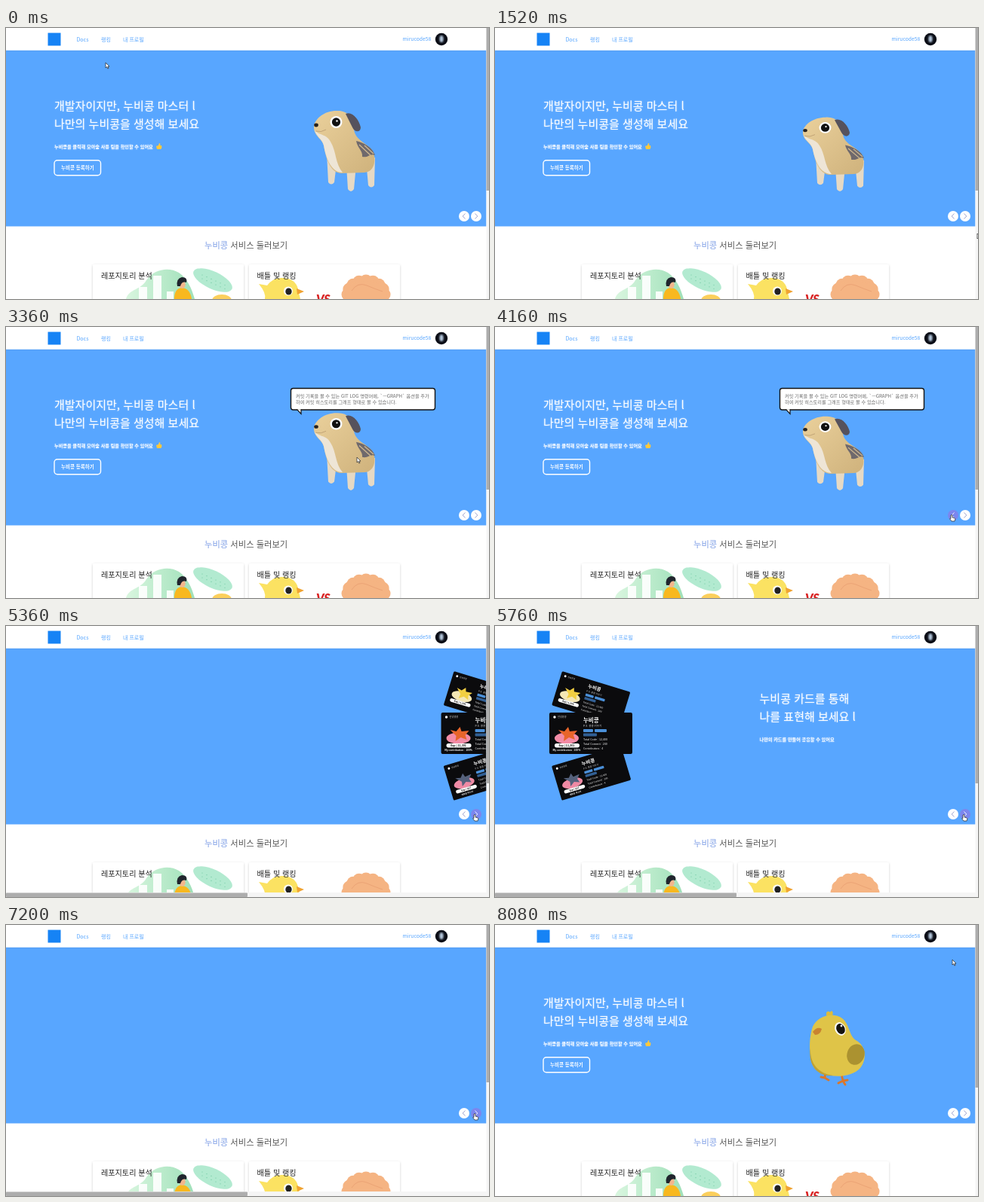
An HTML page that plays this animation: 640 by 360 pixels, repeating every 8160 ms.

```html
<!DOCTYPE html>
<html lang="ko">
<head>
<meta charset="utf-8">
<style>
  html, body { margin: 0; width: 100%; height: 100%; overflow: hidden; background: #fff; }
  svg { display: block; width: 640px; height: 360px; font-family: "Noto Sans CJK KR", "Noto Sans", sans-serif; }
  .glow { text-shadow: 0 0 2px #ffffff80; }
</style>
</head>
<body>
<svg id="stage" viewBox="0 0 640 360"></svg>
<script>
const LOOP = 8160, FRAME = 80, WIDTH = 636.5, BLUE = '#58a6ff';

// Text is placed by its left edge and vertical centre.
const text = (x, y, size, s, attrs = '') =>
  `<text x="${x}" y="${y + size * .36}" font-size="${size}" ${attrs}>${s}</text>`;
const rect = (x, y, w, h, fill, attrs = '') =>
  `<rect x="${x}" y="${y}" width="${w}" height="${h}" fill="${fill}" ${attrs}/>`;
const oval = (x, y, rx, ry, fill, attrs = '') =>
  `<ellipse cx="${x}" cy="${y}" rx="${rx}" ry="${ry}" fill="${fill}" ${attrs}/>`;
const path = (d, fill, attrs = '') => `<path d="${d}" fill="${fill}" ${attrs}/>`;
const group = (attrs, ...parts) => `<g ${attrs}>${parts.join('')}</g>`;

const headline = (x, y, a, b, note) => group('fill="#fff" class="glow"',
  text(x, y, 15, a, 'font-weight="500"'),
  text(x, y + 24, 15, b, 'font-weight="500"'),
  text(x, y + 53.5, 6.15, note, 'font-weight="700"'));

const dog = group('id="dog"',
  path('M425 166L427 205Q431 210 435 205L438 180ZM451 182L453 214Q457 220 461 214L464 182ZM477 175L480 209Q484 214 488 209L489 172Z', '#e6d9c4'),
  path('M408 130C410 120 422 110 438 110C452 109 460 118 461 135C463 149 477 152 485 162C491 171 490 191 475 192L444 193C429 192 424 173 421 156C419 147 407 143 408 130Z', 'url(#fur)'),
  path('M409 136C417 144 424 140 430 151C438 164 436 180 446 192C431 192 424 173 421 156C419 147 411 144 409 136Z', '#eee5d6'),
  path('M464 150C474 152 486 159 489 169C482 166 480 173 472 171C473 163 466 160 464 150Z', '#6f696c'),
  path('M468 155L483 169M475 156L487 167', 'none', 'stroke="#cdb78f" stroke-width="1.3"'),
  path('M450 114C459 110 468 122 470 132C470 139 462 139 459 132Z', '#56525d'),
  oval(437.5, 125, 8, 8, '#fff'), oval(437.5, 125, 5.6, 5.8, '#111'), oval(438.5, 123.5, 1.2, 1.2, '#fff'),
  oval(411, 129, 2.8, 2.4, '#26221f'),
  path('M410 137Q418 139 424 135', 'none', 'stroke="#b2936a" stroke-width=".7"'));

const chick = group('id="chick"',
  path('M438 194L437 203L432 202M437 203L442 206M459 198L461 207L455 210M461 207L464 212M461 207L467 206', 'none', 'stroke="#d9772c" stroke-width="3" stroke-linecap="round"'),
  path('M440 122C437 116 441 113 444 116C446 112 449 115 447 121Z', '#dcbc3d'),
  path('M421 135C427 121 448 115 460 124C470 132 469 147 478 153C492 160 493 179 484 190C473 202 449 204 432 196C414 187 415 153 421 135Z', '#dfc448'),
  path('M418 163C417 184 428 197 448 200C429 202 414 188 418 163Z', '#bfa234'),
  oval(478, 172, 11.5, 14, '#ab9230', 'transform="rotate(18 478 172)"'),
  oval(457.5, 138, 7, 9, '#fff', 'transform="rotate(-25 457.5 138)"'),
  oval(458, 138, 5.5, 7.3, '#17140f', 'transform="rotate(-25 458 138)"'), oval(459, 134, 1.4, 1.4, '#fff'),
  path('M421 142Q427 134 433 138Q431 146 424 146Z', '#c98330'));

const bubble = group('id="bubble"',
  rect(377.5, 81.5, 191, 28.5, '#fff', 'rx="3" stroke="#111" stroke-width="1.4"'),
  path('M385.5 109.3L391 115.5V109.3', '#fff', 'stroke="#111" stroke-width="1.2"'),
  group('fill="#666"', text(384, 91.5, 6.2, '', 'id="tip1"'), text(384, 100, 6.2, '', 'id="tip2"')));

const home = group('id="s0"',
  headline(64, 104, '개발자이지만, 누비콩 마스터 l', '나만의 누비콩을 생성해 보세요', '누비콩을 클릭해 모아숲 사용 팁을 확인할 수 있어요'),
  path('M199 157L202 156L203 153Q205 153 204 156H206Q207 160 205 161H200Z', '#ffc83d'),
  rect(64, 175.8, 61.5, 20, 'none', 'rx="4" stroke="#fff" stroke-width="1.4"'),
  text(73, 185.5, 6.5, '누비콩 등록하기', 'font-weight="700" fill="#fff"'),
  dog, chick, bubble);

const card = (place, tint, base, exp, foot) => group(`transform="${place}"`,
  rect(0, 0, 110, 55, '#0b0b0d', 'rx="2"'),
  oval(7, 6, 1.7, 1.7, '#fff'), text(11, 6, 3.2, '안녕콩콩', 'fill="#ddd"'),
  oval(23, 34, 16, 7.5, base),
  path('M12 23L20 25L25 19L27 25L37 24L32 30L34 36L26 33L19 38L20 31Z', tint),
  rect(7, 41, 33, 5.5, '#fff', 'rx="2.7"'),
  text(23, 43.7, 3.5, exp, 'text-anchor="middle" font-weight="700"'),
  text(23, 50, 3.2, foot, 'text-anchor="middle" font-weight="700" fill="#fff"'),
  text(45, 10, 7.5, '누비콩', 'font-weight="700" fill="#fff"'),
  text(45, 18, 3.5, 'P.S&#160; 콩콩 키우기', 'fill="#ddd"'),
  rect(45, 22, 13, 4, '#4a8fd8', 'rx="1"'), rect(60, 22, 16, 4, '#4a8fd8', 'rx="1"'), rect(45, 27.5, 18, 4, '#315f94', 'rx="1"'),
  ...['Total Code : 12,400', 'Total Commit : 240', 'Contributors : 4'].map((s, i) => text(45, 36 + i * 6, 3.6, s, 'fill="#fff"')));

const cards = group('id="s1"',
  card('translate(88.4 60) rotate(17) scale(.86)', '#f2cf42', '#f4e7b5', 'Exp | 1,204', ''),
  card('translate(74.4 186) rotate(-16.6) scale(.87)', '#55617c', '#ef8aa4', 'Exp | 527', '새로운 마스터'),
  card('translate(71.4 115)', '#e8652a', '#f28ba6', 'Exp | 11,301', 'My contribution : 100%'),
  headline(350, 97, '누비콩 카드를 통해', '나를 표현해 보세요 l', '나만의 카드를 만들어 공유할 수 있어요'));

const stats = [['경쟁력: 227', '#e05252'], ['승격력: 20', '#e5b53c'], ['방어률: 15%', '#64a866'],
  ['치명타율: 15%', '#7a86d8'], ['회피율: 21%', '#5a9bd5'], ['명중률: 12%', '#4b8de0']];
const panel = group('transform="translate(309 106) rotate(-9.3)"',
  rect(0, 0, 90, 93, '#fff', 'rx="1"'),
  text(6, 8, 5.4, '능력치', 'fill="#333"'), text(24, 8, 4, '스탯 포인트: 21', 'fill="#777"'),
  ...stats.map(([s, c], i) => {
    const y = 23 + i * 11.8;
    return oval(9, y, 2.8, 2.8, c) + oval(9, y, 1.1, 1.1, '#fff') + text(15, y, 4.6, s, 'fill="#444"') +
      (i < 2 ? oval(78, y + 9, 2.8, 2.8, '#444') + text(76.4, y + 9, 5, '+', 'fill="#fff"') : '');
  }));

const status = (x, y, name) => group(`transform="translate(${x} ${y})"`,
  rect(0, 0, 71, 23, '#fff', 'stroke="#222" stroke-width="1.4"'),
  text(5, 6, 4, name, 'fill="#333"'), text(5, 12.5, 3.8, 'HP : 100 / 100', 'fill="#333"'),
  rect(5, 17, 58, 2.4, '#5aa9a0'));
const battle = group('transform="translate(400 79) rotate(5)"',
  rect(0, 0, 165, 118.5, '#fff', 'rx="1"'),
  rect(2, 6, 161, 82, '#68b32f'), rect(2, 6, 161, 5, '#3f7a2c'),
  path('M45 31C61 24 82 28 83 44L81 62L58 72Z', '#d8b950'),
  path('M2 46C20 31 54 39 66 60C75 82 48 89 22 84L2 78Z', '#27494c'),
  status(10, 8, '상대 누비콩: 도토리콩'), status(88, 57, '내 누비콩: 별이콩'),
  text(65, 103, 5.2, '하우....힘겹다...&#160; ▾', 'fill="#333"'));

const fight = group('id="s2"',
  headline(64, 97, '누비콩 배틀을 통해', '랭킹에 도전해 보세요 l', '모아숲 활동을 통해 얻은 경험치로 스탯을 올릴 수 있어요'),
  oval(216, 151, 4, 4, '#ffc83d'), path('M212 149H220V151Q218 153 216 150Q214 153 212 151Z', '#222'),
  panel, battle);

const header = group('',
  rect(0, 0, WIDTH, 29.5, '#fff', 'filter="url(#faint)"'),
  rect(55.5, 6.5, 17, 17, '#1683f5'),
  group(`fill="${BLUE}"`, text(93.5, 15, 7, 'Docs'), text(126, 15, 7, '랭킹'), text(155, 15, 7, '내 프로필'), text(525.5, 15, 6.8, 'mirucode58')),
  oval(577, 15, 8.2, 8.2, '#0a0d16'), oval(577, 14.5, 2.6, 4.5, '#b8cbe0', 'filter="url(#blur)"'));

const frame = x => rect(x, 314, 200, 60, '#fff', 'rx="2" filter="url(#soft)"');
const fluff = Array.from({ length: 9 }, (_, i) => {
  const a = Math.PI * (1 + i / 8);
  return oval(477 + 24 * Math.cos(a), 354 + 18 * Math.sin(a), 8.5, 8.5, '#f5b483');
}).join('');
const services = group('',
  text(263, 288.5, 11.3, '<tspan fill="#7f9fe6">누비콩</tspan> 서비스 둘러보기', 'fill="#555" font-weight="300"'),
  frame(115), frame(322),
  path('M159 360C163 346 178 349 186 335C196 320 216 317 229 325C240 332 246 346 250 360Z', 'url(#mint)'),
  rect(176, 344, 11, 16, '#fff', 'opacity=".9"'), rect(195, 329, 11, 31, '#fff', 'opacity=".9"'), rect(213, 350, 9, 10, '#fff', 'opacity=".9"'),
  oval(274, 335, 28, 11.5, '#b2ead0', 'transform="rotate(25 274 335)"'),
  ...Array.from({ length: 12 }, (_, i) => oval(260 + i % 6 * 6, 328 + i % 6 * 2.7 + (i > 5) * 5, .6, .6, '#6fc8a0')),
  oval(286, 362, 13, 8, '#fbcf5c'),
  path('M223 360Q223 346 233 345Q244 346 246 360Z', '#f8b81f'),
  oval(233.5, 341, 4.2, 5, '#f3b78d'), path('M227 343Q225 333 233 331Q241 331 239 338Q233 336 231 343Z', '#20252d'),
  text(126, 329, 10.1, '레포지토리 분석', 'fill="#222"'),
  path('M335 340L346 342Q354 331 367 332Q384 333 387 347L390 360H343Q345 352 335 340Z', '#fbe262'),
  path('M385 346L395 350L386 354Z', '#f0a332'), oval(374, 349.5, 6, 6, '#fff'), oval(374.5, 350, 4.2, 4.5, '#222'),
  fluff, oval(477, 354, 28, 18, '#f5b483'),
  path('M458 349Q466 337 478 342T499 350', 'none', 'stroke="#eba375" stroke-width="1"'),
  text(411, 360.3, 16, 'VS', 'fill="#d92323" font-weight="900" font-style="italic" font-family="Lato, sans-serif"'),
  text(332.5, 329, 10.1, '배틀 및 랭킹', 'fill="#222"'));

const arrow = (id, x, d) => group(`id="${id}"`,
  `<circle cx="${x}" cy="250" r="7"/>`,
  path(`M${x - d * 1.5} 246.5l${d * 3.3} 3.5l${-d * 3.3} 3.5`, 'none', 'stroke-width=".9"'));

const pointer = group('id="cursor"',
  path('M0 0V7L1.7 5.5L2.8 8L4 7.5L2.9 5.1H5Z', '#fff', 'id="tipArrow" stroke="#222" stroke-width=".7"'),
  path('M-1 0Q0 -1 1 0V3L4 3.8Q5 4 4.7 6L4 8H0L-2.4 4.8Q-2 3.6 -1 4.5Z', '#fff', 'id="tipHand" stroke="#222" stroke-width=".7"'));

const $ = id => document.getElementById(id);
$('stage').innerHTML = `<defs>
  <clipPath id="banner">${rect(0, 29.5, WIDTH, 234, '#000')}</clipPath>
  <filter id="soft"><feDropShadow dx="0" dy="1" stdDeviation="1.5" flood-opacity=".2"/></filter>
  <filter id="faint"><feDropShadow dx="0" dy=".5" stdDeviation="1" flood-opacity=".08"/></filter>
  <filter id="blur"><feGaussianBlur stdDeviation=".9"/></filter>
  <linearGradient id="fur" x2="1" y2="1"><stop stop-color="#ead09b"/><stop offset="1" stop-color="#cfb27c"/></linearGradient>
  <linearGradient id="mint"><stop stop-color="#d9f6df"/><stop offset="1" stop-color="#9fe0b9"/></linearGradient></defs>` +
  rect(0, 0, 640, 360, '#fff') + rect(0, 29.5, WIDTH, 234, BLUE) +
  group('clip-path="url(#banner)"', home, cards, fight) + header + services +
  arrow('prev', 607, -1) + arrow('next', 623, 1) +
  rect(WIDTH, 0, 3.5, 360, '#f5f5f5') + rect(WIDTH, 0, 3.5, 216, '#adadad', 'id="vbar"') +
  group('id="hbar"', rect(0, 354, 640, 6, '#f5f5f5'), rect(0, 354.5, 320, 5.5, '#adadad', 'rx="1"')) + pointer;

// The standard CSS "ease" curve.
function ease(x) {
  if (x >= 1) return 1;
  let lo = 0, hi = 1, u;
  for (let i = 0; i < 24; i++) {
    u = (lo + hi) / 2;
    if (.75 * u * (1 - u) + u ** 3 < x) lo = u; else hi = u;
  }
  return .3 * (1 - u) ** 2 * u + 3 * (1 - u) * u * u + u ** 3;
}

const show = (id, on) => { $(id).style.display = on ? '' : 'none'; };
const slides = [[-1000, 0], [5280, 1], [6143, 2], [7200, 0]];
const tips = [
  ['GIT BRANCH –A 명령어를 사용하여 모든 로컬 및 리모트 브랜치 목', '록을 볼 수 있습니다.'],
  ['커밋 기록을 볼 수 있는 GIT LOG 명령어에, `—GRAPH` 옵션을 추가', '하여 커밋 히스토리를 그래프 형태로 볼 수 있습니다.']];
// time, x, y
const route = [[0, 132, 46], [160, 132, 46], [900, 420, 240], [1440, 639, 273], [1680, 639, 273], [2240, 465, 173],
  [3520, 465, 173], [4000, 605, 250], [4500, 605, 250], [4900, 621, 251], [7520, 621, 251], [8000, 606, 46], [LOOP, 606, 46]];

function cursorAt(t) {
  const i = route.findIndex(p => p[0] > t), [t0, x0, y0] = route[i - 1], [t1, x1, y1] = route[i];
  const k = (t - t0) / (t1 - t0), s = k * k * (3 - 2 * k);
  return [x0 + (x1 - x0) * s, y0 + (y1 - y0) * s];
}

function paintArrow(id, hot) {
  $(id).setAttribute('fill', hot ? '#7c86ee' : '#fff');
  $(id).setAttribute('stroke', hot ? '#fff' : '#959bcb');
  $(id).firstChild.setAttribute('stroke', 'none');
}

function draw(now) {
  const t = Math.floor(now % LOOP / FRAME) * FRAME;
  const [start, current] = slides.filter(s => s[0] <= t).pop();
  const offset = WIDTH * (1 - ease((t - start) / 500));
  for (let i = 0; i < 3; i++) show('s' + i, i === current);
  $('s' + current).setAttribute('transform', `translate(${offset} 0)`);
  show('hbar', offset > 0);
  $('vbar').setAttribute('height', offset > 0 ? 209 : 216);

  const late = t >= 7200;
  show('dog', !late);
  show('chick', late);
  const squash = 1 - .042 * (1 - Math.cos(t / 2700 * 2 * Math.PI));
  $('dog').setAttribute('transform', `translate(0 217) scale(1 ${squash}) translate(0 -217)`);
  show('bubble', t >= 2320 && !late);
  tips[t < 3120 ? 0 : 1].forEach((s, i) => { $('tip' + (i + 1)).textContent = s; });

  const [x, y] = cursorAt(t);
  $('cursor').setAttribute('transform', `translate(${x} ${y})`);
  const near = cx => Math.hypot(x - cx, y - 250) < 7.5;
  const onPrev = near(607), onNext = near(623);
  paintArrow('prev', onPrev);
  paintArrow('next', onNext);
  show('tipHand', onPrev || onNext);
  show('tipArrow', !onPrev && !onNext);
}

const origin = performance.now();
function tick() {
  draw(performance.now() - origin);
  requestAnimationFrame(tick);
}
tick();
</script>
</body>
</html>
```
